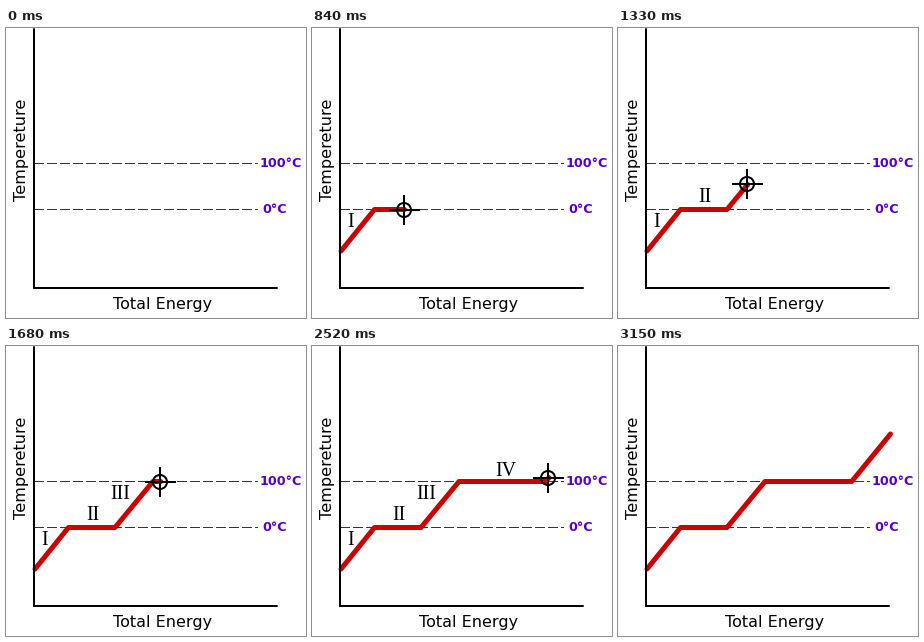
Write a matplotlib script that moves like this. It is 300 px wide and 290 px high and loops after 3220 ms.

```python
import numpy as np
import matplotlib.pyplot as plt
from matplotlib.animation import FuncAnimation
from matplotlib.patches import Circle

W, H, DPI = 300, 290, 100
FRAMES, STEP_MS = 46, 70
SPEED, LAG = 7.0, 0.7          # pixels per step along the curve
PX = 72 / DPI                  # points per pixel
PURPLE, RED = "#5500cc", "#cc0000"

CURVE = np.array([(29, 223), (62.5, 181.5), (109, 181.5),
                  (147, 135.5), (233.7, 135.5), (272.5, 88)])
ARC = np.r_[0, np.cumsum(np.hypot(*np.diff(CURVE, axis=0).T))]

fig = plt.figure(figsize=(W / DPI, H / DPI), dpi=DPI, facecolor="white")
ax = fig.add_axes([0, 0, 1, 1])
ax.set(xlim=(0, W), ylim=(H, 0))
ax.axis("off")


def line(xs, ys, width, color="black", **kw):
    return ax.plot(xs, ys, color=color, lw=width * PX, **kw)[0]


def label(x, y, text, size, family="DejaVu Sans", **kw):
    return ax.text(x, y, text, fontsize=size * PX, family=family,
                   va="baseline", **kw)


# Axes, guide lines and captions
line([28, 28], [1, 260], 2, zorder=4, solid_capstyle="round")
line([28, 271], [260, 260], 2, zorder=4, solid_capstyle="round")
for y, x, text in [(135.5, 253.3, "100°C"), (181.5, 256.2, "0°C")]:
    line([28, 252], [y, y], 1, "#333333", zorder=1, snap=False,
         dashes=(10, 3), dash_capstyle="butt")
    label(x, y + 3.5, text, 12.7, color=PURPLE, weight="bold")
label(156.5, 281, "Total Energy", 16.05, ha="center")
label(20, 121.8, "Tempereture", 16.1, ha="center",
      rotation=90, rotation_mode="anchor")

# Stage numerals with the step at which each one shows up
numerals = [
    (start, label(x, y, text, 20, "Liberation Serif", zorder=5))
    for start, x, y, text in [(8, 35.5, 199, "I"), (15, 80, 174, "II"),
                              (24, 104.5, 153, "III"), (36, 183, 130, "IV")]
]

trace = line([], [], 5, RED, zorder=3,
             solid_capstyle="round", solid_joinstyle="round")
bar = line([], [], 2, zorder=6, solid_capstyle="butt")
post = line([], [], 2, zorder=6, solid_capstyle="butt")
ring = Circle((0, 0), 7, fill=False, ec="black", lw=2 * PX, zorder=6)
ax.add_patch(ring)


def update(i):
    dist = min(max(SPEED * i - LAG, 0), ARC[-1])
    tip = np.array([np.interp(dist, ARC, CURVE[:, k]) for k in (0, 1)])
    trace.set_data(*np.vstack([CURVE[ARC < dist], tip]).T)
    trace.set_visible(i > 0)

    cx, cy = np.floor(tip + (0, 0.5))
    bar.set_data([cx - 15, cx + 16], [cy, cy])
    post.set_data([cx, cx], [cy - 15, cy + 15])
    ring.center = cx, cy
    moving = 0 < i < FRAMES - 1
    for part in (bar, post, ring):
        part.set_visible(moving)
    for start, text in numerals:
        text.set_visible(moving and i >= start)
    return [trace, bar, post, ring] + [text for _, text in numerals]


anim = FuncAnimation(fig, update, frames=FRAMES, interval=STEP_MS,
                     init_func=lambda: update(0), repeat=True,
                     repeat_delay=0, blit=False)
plt.show()
```
